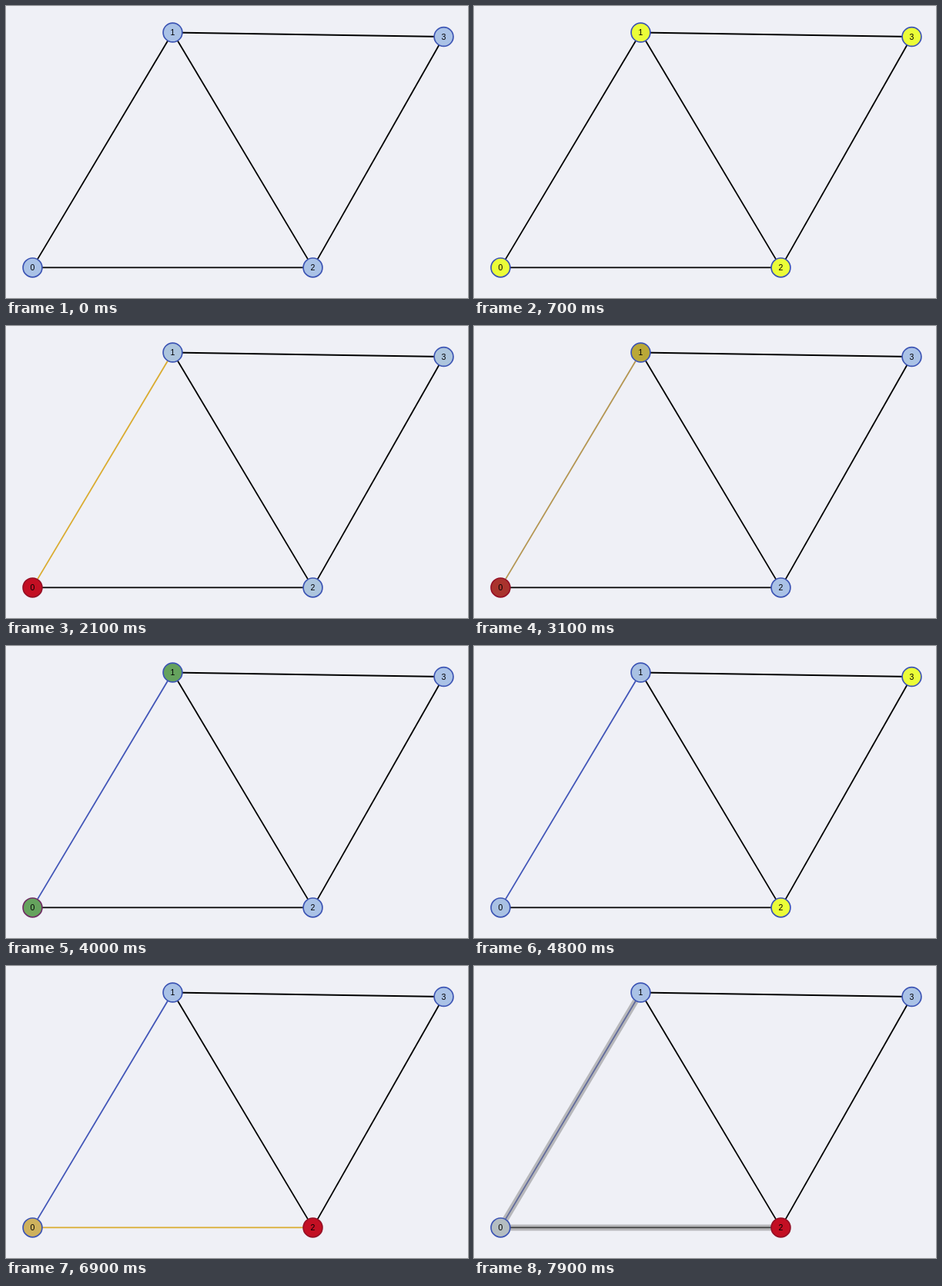
These frames come from a looping animation (600 by 380 pixels, 8 s). An HTML page with a canvas:

```html
<!DOCTYPE html>
<html>
<head>
<meta charset="utf-8">
<style>
html, body { margin: 0; width: 100%; height: 100%; overflow: hidden; background: #eff0f6; }
canvas { display: block; }
</style>
</head>
<body>
<canvas id="stage" width="600" height="380"></canvas>
<script>
const ctx = document.getElementById('stage').getContext('2d');
const LOOP = 8000;
const BG = '#eff0f6';
const BLUE = [170, 194, 230], YELLOW = [235, 253, 56], RED = [195, 15, 35];
const GREEN = [92, 158, 76], GOLD = [218, 172, 48], BLACK = [0, 0, 0];
const RIM = [60, 84, 180], RED_RIM = [150, 16, 38], TREE = [66, 86, 184];

// Each track is a start value followed by [from, to, value] changes.
const nodes = [
  {
    x: 34.5, y: 340.4,
    fill: [BLUE, [50, 600, YELLOW], [950, 1350, BLUE], [1350, 1850, RED],
      [2900, 3500, GREEN], [3750, 4900, BLUE], [6300, 7200, GOLD], [7200, 8200, BLUE]],
    rim: [RIM, [1000, 1400, RED_RIM], [3500, 4600, RIM]]
  },
  {
    x: 216.5, y: 34.5,
    fill: [BLUE, [50, 600, YELLOW], [950, 2300, BLUE], [2300, 2800, GOLD],
      [2900, 3500, GREEN], [3750, 4900, BLUE]],
    rim: [RIM]
  },
  {
    x: 398.5, y: 340.4,
    fill: [BLUE, [50, 600, YELLOW], [950, 2300, BLUE], [4100, 4600, YELLOW],
      [4900, 5850, BLUE], [5850, 6300, RED]],
    rim: [RIM, [5050, 5700, RED_RIM]]
  },
  {
    x: 568.5, y: 40,
    fill: [BLUE, [50, 600, YELLOW], [950, 2300, BLUE], [4100, 4600, YELLOW], [4900, 5900, BLUE]],
    rim: [RIM]
  }
];

const edges = [
  { ends: [0, 1], color: [BLACK, [1650, 2050, GOLD], [2900, 3500, TREE]] },
  { ends: [0, 2], color: [BLACK, [6150, 6650, GOLD], [7200, 7700, BLACK]] },
  { ends: [1, 2], color: [BLACK] },
  { ends: [1, 3], color: [BLACK] },
  { ends: [2, 3], color: [BLACK] }
];

function ease(t, from, to) {
  const p = Math.min(1, Math.max(0, (t - from) / (to - from)));
  return (1 - Math.cos(Math.PI * p)) / 2;
}

function colorAt([start, ...changes], t) {
  let c = start;
  for (const [from, to, next] of changes) {
    const k = ease(t, from, to);
    c = c.map((v, i) => v + (next[i] - v) * k);
  }
  return `rgb(${c.map(Math.round).join(',')})`;
}

function line([a, b], color, width) {
  ctx.strokeStyle = color;
  ctx.lineWidth = width;
  ctx.beginPath();
  ctx.moveTo(nodes[a].x, nodes[a].y);
  ctx.lineTo(nodes[b].x, nodes[b].y);
  ctx.stroke();
}

function drawNode(n, label, t) {
  ctx.beginPath();
  ctx.arc(n.x, n.y, 12.4, 0, Math.PI * 2);
  ctx.fillStyle = colorAt(n.fill, t);
  ctx.fill();
  ctx.strokeStyle = colorAt(n.rim, t);
  ctx.lineWidth = 1.7;
  ctx.stroke();
  ctx.fillStyle = '#000';
  ctx.fillText(label, n.x, n.y + 3.6);
}

function draw(t) {
  ctx.fillStyle = BG;
  ctx.fillRect(0, 0, 600, 380);
  for (const e of edges) line(e.ends, colorAt(e.color, t), 1.8);

  const glow = 0.5 * ease(t, 7300, 7750);
  if (glow > 0) {
    for (const e of edges.slice(0, 2)) line(e.ends, `rgba(128,128,128,${glow})`, 8);
  }

  ctx.font = '10.5px "Liberation Sans", Arial, sans-serif';
  ctx.textAlign = 'center';
  nodes.forEach((n, i) => drawNode(n, i, t));
}

const begin = performance.now();
function tick() {
  draw((performance.now() - begin) % LOOP);
  requestAnimationFrame(tick);
}
tick();
</script>
</body>
</html>
```
